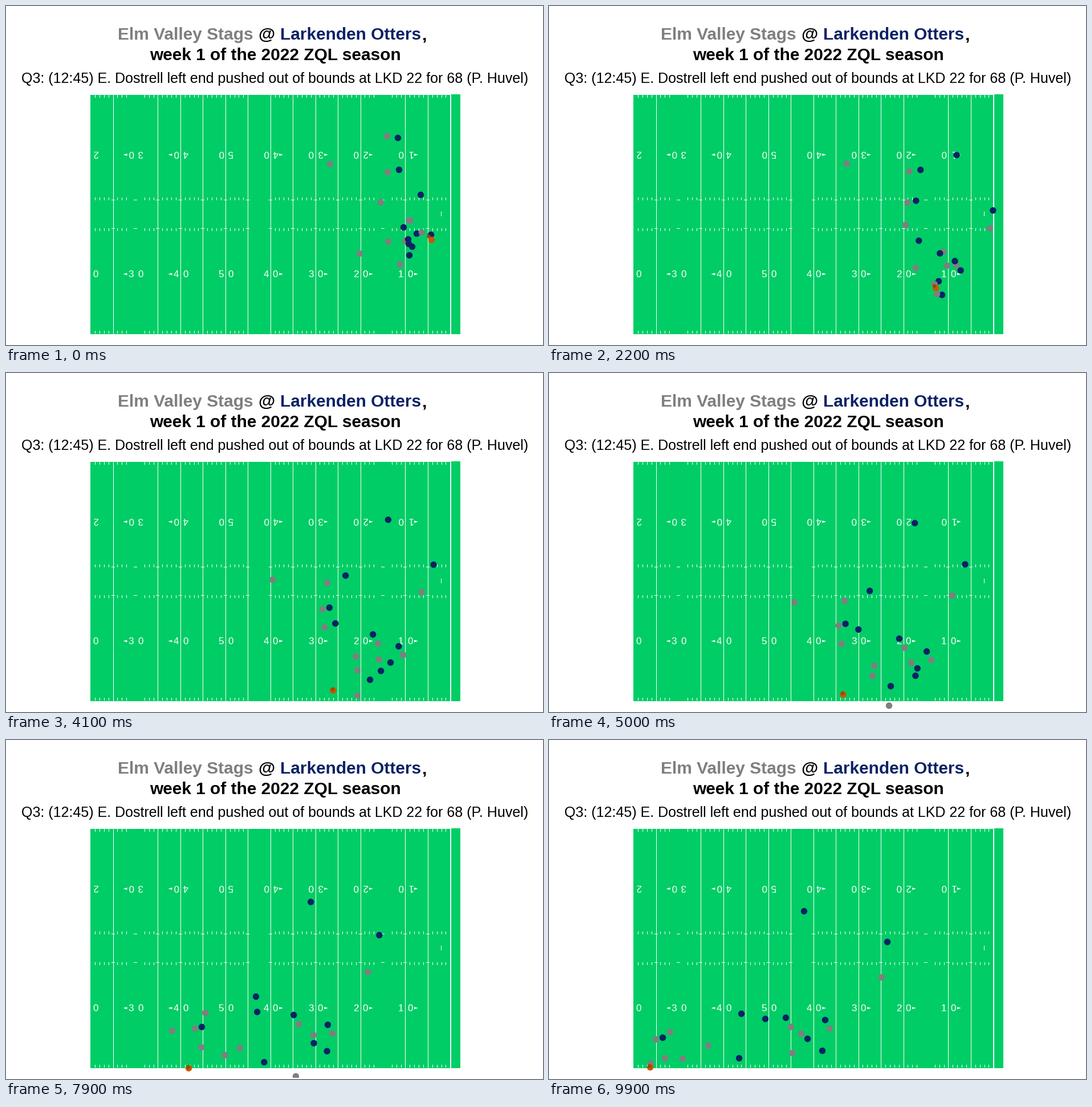
A matplotlib script that plays this animation: 942x595 px, repeating every 10 s.

```python
import numpy as np
import matplotlib.pyplot as plt
from matplotlib.animation import FuncAnimation
from matplotlib.collections import PatchCollection
from matplotlib.patches import Polygon, Rectangle

W, H, DPI = 942, 595, 64
FRAMES, STEP = 100, 100
GREEN, GREY, NAVY = "#00CD66", "#7F7F7F", "#0B2265"
ORANGE, BROWN = "#CC5500", "#964B00"
PX = 72 / DPI

plt.rcParams["font.family"] = "Liberation Sans"

fig = plt.figure(figsize=(W / DPI, H / DPI), dpi=DPI, facecolor="white")
ax = fig.add_axes([0, 0, 1, 1])
ax.set_xlim(0, W)
ax.set_ylim(H, 0)
ax.axis("off")


def label(x, y, text, size, **kw):
    ax.text(x, y, text, fontsize=size * PX, va="baseline", **kw)


def fill(boxes, color):
    """Fill pixel-aligned boxes given as (x, y, width, height)."""
    rects = [Rectangle((x, y), w, h) for x, y, w, h in boxes]
    ax.add_collection(PatchCollection(rects, facecolor=color, linewidth=0,
                                      antialiased=False))


# Field
TOP, BOTTOM, HASH = 156, 576, (340, 390)


def yard_x(yards):
    return 779.8 - 7.89 * yards


def column(yards):
    return int(yard_x(yards))


bare = (15, 70)  # five-yard marks without a full line
fives = range(5, 80, 5)
ticks = [y for y in range(1, 80) if y % 5 and not 40 < y < 45
         and all(abs(y - b) > 1 for b in bare)]

fill([(148, TOP, 631, BOTTOM - TOP), (781, 155, 16, BOTTOM - 155)], GREEN)
fill([(column(y), TOP, 1, BOTTOM - TOP) for y in fives if y not in bare]
     + [(column(y), y0, 1, 5) for y in ticks
        for y0 in (TOP, HASH[0] - 4, HASH[1], BOTTOM - 6)]
     + [(column(y) - 3, y0, 6, 1) for y in fives for y0 in HASH]
     + [(763, 361, 1, 8)], "white")

# Yard numbers and their direction arrows
for yards in range(10, 90, 10):
    x = yard_x(yards)
    tens = str(min(yards, 100 - yards) // 10)
    side = np.sign(50 - yards)
    for mid, base, turn, pair in ((470.5, 476.5, 0, tens + "0"),
                                  (261, 253.5, 180, "0" + tens)):
        for dx, char in zip((-8, 8.3), pair):
            if x + dx > 150:
                label(x + dx, base, char, 17, color="white", ha="center",
                      rotation=turn, rotation_mode="anchor")
        if side and yards < 80:
            ax.add_patch(Polygon([(x + side * 15, mid - 2),
                                  (x + side * 15, mid + 2),
                                  (x + side * 22, mid)], fc="white", lw=0))

# Titles
BIG, SMALL = 29.87, 25.05
for x, text, color in ((196, "Elm Valley Stags", GREY), (442, "@", "black"),
                       (481.4, "Larkenden Otters", NAVY), (729.5, ",", "black")):
    label(x, 59, text, BIG, color=color, weight="bold")
label(472, 95, "week 1 of the 2022 ZQL season", BIG, weight="bold", ha="center")
label(471.5, 135, "Q3: (12:45) E. Dostrell left end pushed out of bounds "
      "at LKD 22 for 68 (P. Huvel)", SMALL, ha="center")

# Movement: every player runs to a cut, then turns and chases to the left
BEND, CUT, LAST = 1.3, 3.1, 9.9
t = np.arange(FRAMES)[:, None] * STEP / 1000
early = np.clip(t / CUT, 0, 1)
late = np.clip((t - CUT) / (LAST - CUT), 0, 1)


def ease(u, pace):
    """Quadratic from 0 to 1; pace is the speed at the beginning."""
    return pace * u + (1 - pace) * u**2


def bump(u):
    return 4 * u * (1 - u)


def run(start, cut, end, bend=None, bow=(0, 0)):
    """Path over start, cut and end; bend bows the first leg, bow the second."""
    start, cut, end, bow = np.array([start, cut, end, bow], float)
    path = start + (cut - start) * ease(early, 0.55)
    if bend:
        u = BEND / CUT
        off = bend - (start + (cut - start) * ease(u, 0.55))
        path += off * bump(early) / bump(u)
    return path + (end - cut) * ease(late, np.array([0.75, 1.8])) + bow * bump(late)


def shadow(path, gap0, gap1):
    """Stay on another player while the gap changes during the first leg."""
    gap0, gap1 = np.array([gap0, gap1])
    return path + gap0 + (gap1 - gap0) * ease(early, 0.55)


HIGH, LOW, SLOW = (0, -12), (0, 14), (22, 6)

# Offense
motion = run((727, 331), (699, 251), (447, 300), bend=(724, 282), bow=HIGH)
passer = run((745, 401), (770, 338), (593, 354), bend=(774, 377), bow=HIGH)
wide = run((687, 231), (629, 322), (337, 480), bow=HIGH)
slot = run((689, 287), (615, 375), (199, 522))
tight = run((697, 388), (618, 426), (379, 489), bow=(-26, -5))
left = run((705, 409), (673, 449), (415, 487))
center = run((706, 417), (715, 466), (484, 491), bow=LOW)
right = run((720, 399), (703, 493), (453, 524), bend=(729, 436), bow=LOW)
lead = run((707, 437), (668, 511), (479, 545), bow=SLOW)
pull = run((712, 422), (678, 522), (333, 558), bend=(699, 480), bow=LOW)
runner = run((746, 410), (636, 547), (177, 574), bow=(-19, 6))
ball = shadow(runner, (-5, -6), (-1, -2))

# Defense
deep = run((568, 277), (505, 315), (178, 567), bend=(540, 260), bow=(0, -30))
corner = run((668, 228), (609, 328), (212, 512), bow=HIGH)
nickel = shadow(slot, (-20, 4), (-12, 3))
safety = run((657, 344), (605, 409), (203, 558))
edge = run((709, 376), (753, 377), (583, 416), bend=(766, 392), bow=(-9, -5))
backer = run((620, 434), (657, 475), (279, 536), bow=LOW)
inside = shadow(left, (1, -33), (9, 16))
nose = shadow(center, (-6, -5), (8, 15))
middle = run((670, 413), (669, 494), (442, 515), bend=(703, 429), bow=SLOW)
end = run((691, 453), (666, 509), (234, 559))
chaser = run((729, 397), (634, 537), (426, 549), bend=(711, 466), bow=(12, 51))

# From back to front: colour, diameter, paths
LAYERS = [
    (GREY, 11.4, [deep, corner, nickel, safety, edge, backer, inside, nose, middle]),
    (NAVY, 11.4, [motion, passer, wide, slot, tight, left, center, right, lead, pull]),
    (GREY, 11.4, [end]),
    (ORANGE, 11.4, [runner]),
    (GREY, 11.4, [chaser]),
    (BROWN, 6.5, [ball]),
]
colors = [c for c, _, group in LAYERS for _ in group]
sizes = [(d * PX) ** 2 for _, d, group in LAYERS for _ in group]
paths = np.stack([p for *_, group in LAYERS for p in group], axis=1) + 0.5

dots = ax.scatter(*paths[0].T, s=sizes, c=colors, linewidths=0, zorder=5)
dots.set_clip_path(Rectangle((0, 0), W, 593, transform=ax.transData))


def update(i):
    dots.set_offsets(paths[i])
    return dots,


anim = FuncAnimation(fig, update, frames=FRAMES, interval=STEP,
                     repeat=True, repeat_delay=0)
plt.show()
```
